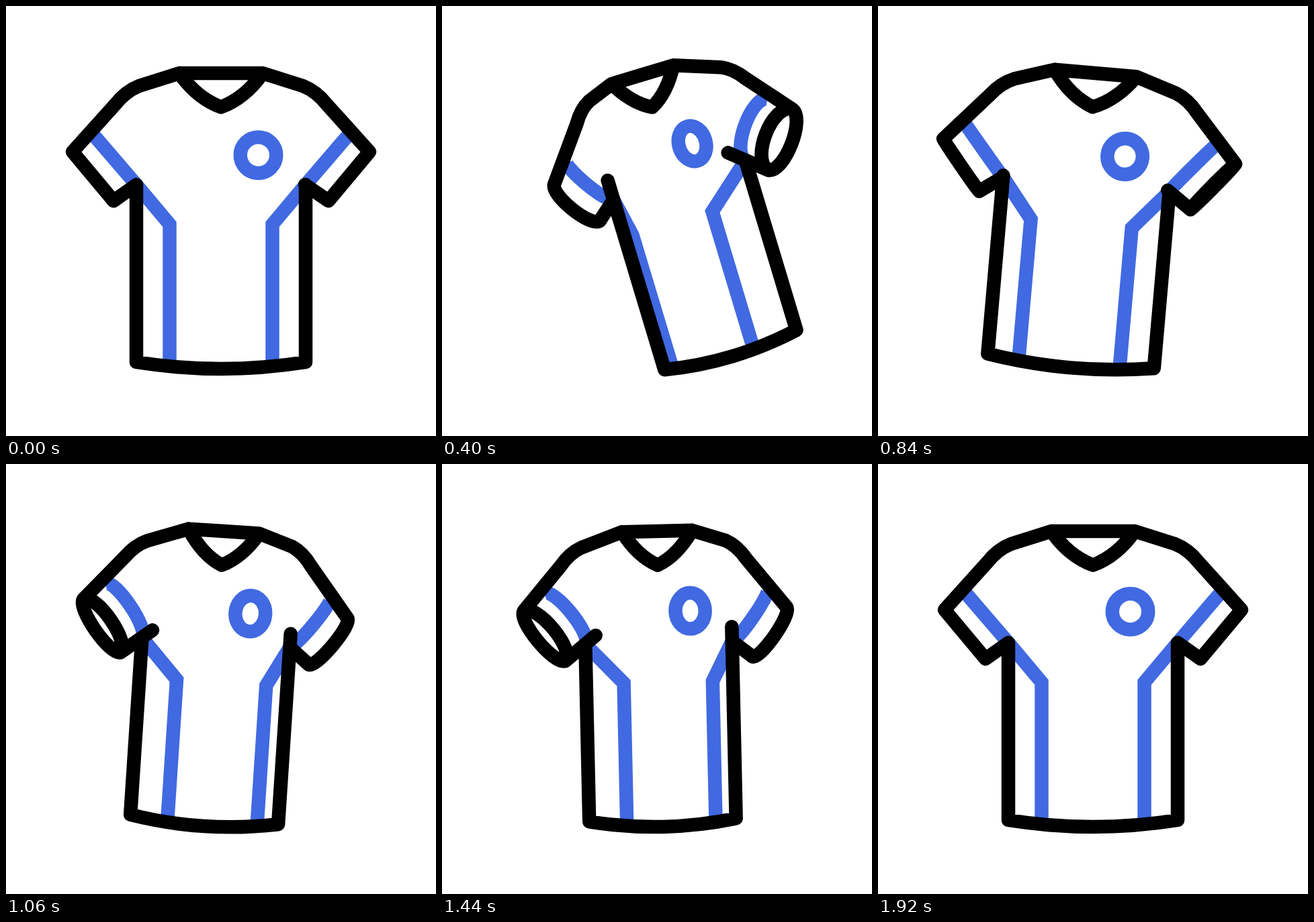
An HTML page for the animation above (2400 ms loop, 640x640 px).

```html
<!DOCTYPE html>
<html lang="en">
<head>
<meta charset="utf-8">
<title>Football shirt</title>
<style>
  html, body { margin: 0; width: 100%; height: 100%; overflow: hidden; background: #fff; }
  svg { display: block; width: 100%; height: 100%; }
  g { fill: none; stroke: #000; stroke-width: 20.5; stroke-linecap: round; stroke-linejoin: round; }
  .blue { stroke: #4169e1; stroke-linecap: butt; stroke-linejoin: miter; }
</style>
</head>
<body>
<svg viewBox="0 0 640 640">
  <g id="shirt">
    <path id="stripes" class="blue"/>
    <ellipse id="badge" class="blue"/>
    <path id="outline"/>
  </g>
</svg>
<script>
const LOOP = 2400;
// [time in ms, value]
const TILT = [[0, 0], [200, 8.8], [400, 16.7], [510, 18], [640, 15], [840, -4.9],
  [930, -7.6], [1280, 4.6], [1600, -2], [1920, 0]];
const TURN = [[0, 0], [200, 0.28], [400, 1], [470, 1.04], [640, 0.65], [840, 0.08],
  [1240, -1.01], [1600, -0.38], [1920, 0]];

// Smooth curve through the keys, flat at ends and turning points
function slope(keys, i) {
  const a = keys[i - 1], b = keys[i], c = keys[i + 1];
  if (!a || !c || (b[1] - a[1]) * (c[1] - b[1]) <= 0) return 0;
  return (c[1] - a[1]) / (c[0] - a[0]);
}

function sample(keys, t) {
  const i = keys.findIndex(k => k[0] > t) - 1;
  if (i < 0) return keys[keys.length - 1][1];
  const [t0, p0] = keys[i], [t1, p1] = keys[i + 1];
  const d = t1 - t0, s = (t - t0) / d, r = 1 - s;
  return p0 * r * r * (1 + 2 * s) + p1 * s * s * (1 + 2 * r)
    + d * s * r * (slope(keys, i) * r - slope(keys, i + 1) * s);
}

// Curve between two points, bulging outwards by the given height
function arc(a, b, height) {
  const dx = b[0] - a[0], dy = b[1] - a[1], len = Math.hypot(dx, dy), h = height * 4 / 3 / len;
  const at = k => [a[0] + dx * k + dy * h, a[1] + dy * k - dx * h];
  return [at(0.05), at(0.95), b];
}

// Amount for a turn one way or the other
const pick = (v, front, back) => (v > 0 ? front : back) * Math.abs(v);

// One half of the shirt; v > 0 opens this sleeve to the viewer
function half(side, turn) {
  const v = side * turn, n = Math.abs(turn);
  const pts = list => list.map(([x, y]) => (side * x).toFixed(2) + ' ' + y.toFixed(2)).join(' ');
  const move = p => 'M' + pts([p]);
  const line = (...p) => 'L' + pts(p);
  const cubic = p => 'C' + pts(p);

  const shift = side * pick(turn, -7.5, 1.5);
  const stripe = side * pick(turn, -28.5, 18) + 76.5 - 14.5 * n;
  const width = 126 - 23.5 * n;
  const neck = [62 - 14 * n + shift, 0];
  const k = 1 - pick(v, 0.12, 0.22), drop = pick(v, 4, -4);
  const cuffTop = [221 - pick(v, 30, 41), 117 - pick(v, 4, -1)];
  const cuffEnd = [160 - 29 * n, 190];
  const armpit = v > 0 ? [125 - 44 * v, 166 - 18 * v] : [width, 166];
  const bodyTop = [width, v > 0 ? 166 + 6 * v : 166 + 30 * v];

  let outline = move([shift, 0]) + line(neck, [122 * k, 19 + drop])
    + 'Q' + pts([[142 * k, 27 + drop], [157 * k, 46 + drop]])
    + line(cuffTop) + cubic(arc(cuffTop, cuffEnd, pick(v, 18, 12.5))) + line(armpit)
    + move(bodyTop) + line([width, 430]) + 'Q' + pts([[width / 2, 440], [0, 440]])
    + move(neck) + 'Q' + pts([[shift + 36 - 9 * n, 37], [shift, 50.5]]);
  if (v > 0) outline += move(cuffTop) + cubic(arc(cuffTop, cuffEnd, -23 * v));

  const start = [193 - pick(v, 33, 39), 88], joint = [width, 166];
  const stripes = move(start) + cubic(arc(start, joint, pick(v, -18, 8)))
    + line([stripe, 225], [stripe, 432]);
  return { outline, stripes };
}

const el = id => document.getElementById(id);
const set = (id, attrs) => {
  for (const name in attrs) el(id).setAttribute(name, attrs[name]);
};

function draw(now) {
  const t = now % LOOP;
  const tilt = sample(TILT, t), turn = sample(TURN, t), n = Math.abs(turn);
  const left = half(-1, turn), right = half(1, turn);
  const x = 320 - 50 * Math.sin(tilt * Math.PI / 180);
  set('shirt', { transform: `translate(${x} 100) rotate(${-tilt})` });
  set('outline', { d: left.outline + right.outline });
  set('stripes', { d: left.stripes + right.stripes });
  set('badge', {
    cx: 55.5 - pick(turn, 21.5, 10.5),
    cy: 119.7 + 2.3 * Math.max(0, 1 - t / 400),
    rx: 26.75 - 6.5 * n,
    ry: 26.75
  });
  requestAnimationFrame(() => draw(performance.now()));
}
draw(0);
</script>
</body>
</html>
```
